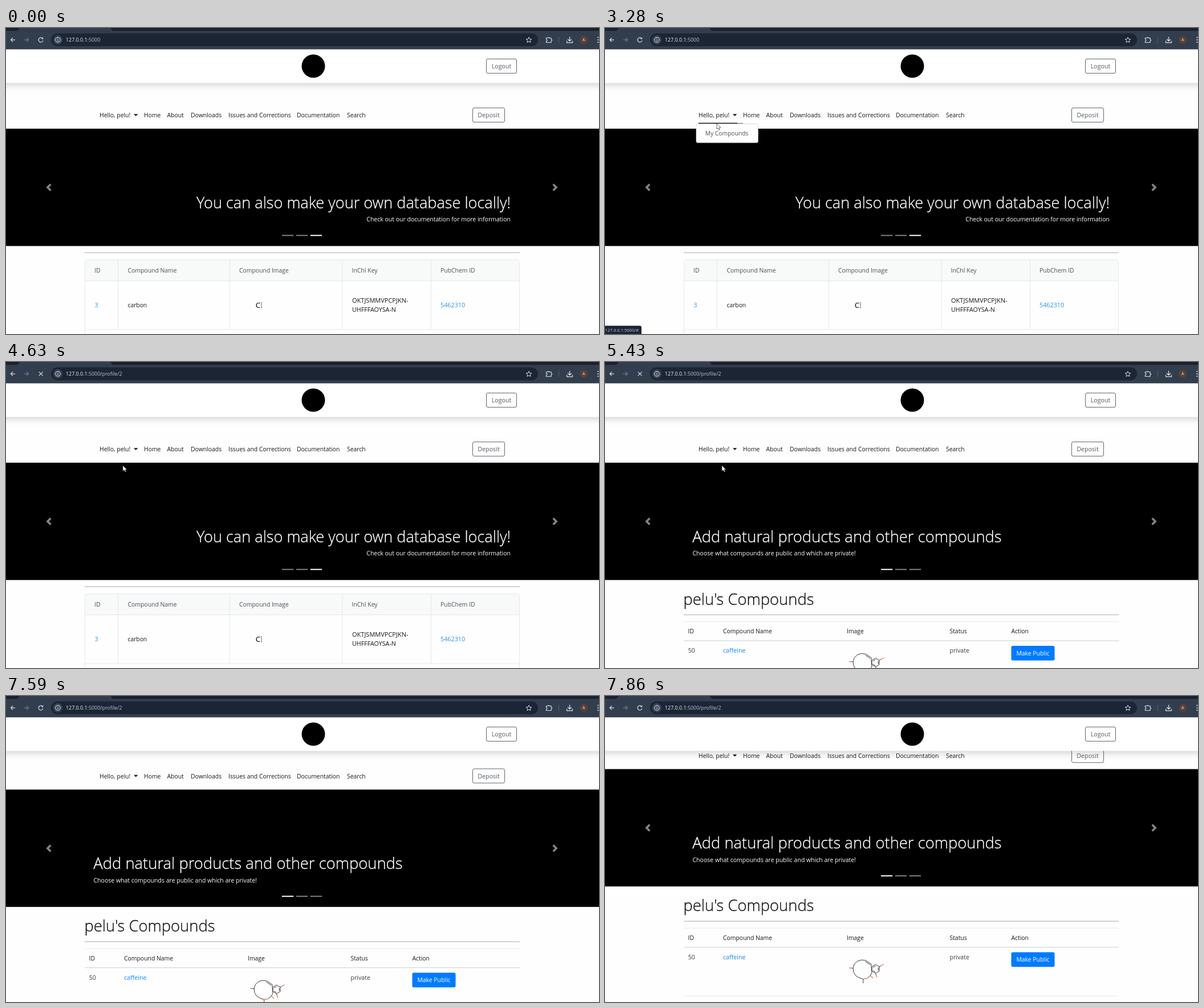
Animation, 1040 px wide and 538 px high, one loop 8000 ms. Source, as an HTML page:

```html
<!DOCTYPE html>
<html lang="en">
<head>
<meta charset="utf-8">
<title>Compound database</title>
<style>
  html, body { margin: 0; width: 100%; height: 100%; overflow: hidden; background: #fefefe; }
  svg { display: block; width: 100vw; height: 100vh; }
  text { font-family: "Open Sans", "Noto Sans", sans-serif; white-space: pre; }
  #header { filter: drop-shadow(0 5px 5.3px rgba(0, 0, 0, .15)); }
</style>
</head>
<body>
<svg id="stage" viewBox="0 0 1040 538"></svg>
<script>
const LOOP = 8000;
const INK = '#16181b', LINK = '#2f93e0', RULE = '#e4e7ea';

// Markup helpers
const text = (x, y, s, { size = 10.5, fill = INK, weight = 400, anchor = 'start', extra = '' } = {}) =>
  `<text x="${x}" y="${y}" font-size="${size}" fill="${fill}" font-weight="${weight}" text-anchor="${anchor}" ${extra}>${s}</text>`;
const heading = (x, y, s, size, fill, anchor) =>
  text(x, y, s, { size, fill, anchor, weight: 300, extra: `stroke="${fill}" stroke-width=".35"` });
const rect = (x, y, w, h, fill, rx = 0, extra = '') =>
  `<rect x="${x}" y="${y}" width="${w}" height="${h}" fill="${fill}" rx="${rx}" ${extra}/>`;
const path = (d, stroke, width = 1, fill = 'none', extra = '') =>
  `<path d="${d}" stroke="${stroke}" stroke-width="${width}" fill="${fill}" ${extra}/>`;
const circle = (x, y, r, fill, extra = '') => `<circle cx="${x}" cy="${y}" r="${r}" fill="${fill}" ${extra}/>`;
const group = (id, ...parts) => `<g id="${id}">${parts.join('')}</g>`;
const row = (y, cells, style) => cells.map(([x, s]) => text(x, y, s, style)).join('');
const outlineButton = (x, y, w, label) =>
  rect(x, y, w, 25, '#fff', 2.5, 'stroke="#60666c"') +
  text(x + w / 2, y + 16.6, label, { size: 10.7, fill: '#555b61', anchor: 'middle' });

const browserBar = () => [
  rect(0, 0, 1040, 37.5, '#323d4d'),
  path('M0 0H24Q22 5 17 5H0ZM184 0H1040V5H190Q185 5 184 0Z', 'none', 0, '#19212e'),
  rect(79, 9.5, 854, 22.5, '#1c2534', 11.2),
  circle(91, 20.8, 8, '#384557'),
  circle(91, 20.8, 4.3, 'none', 'stroke="#e3e8ef"'),
  path('M91 20.2V23.2M91 18.2V19.3', '#e3e8ef', 1),
  path('M16 20.8H8.5M12 17.2 8.4 20.8 12 24.4', '#d8dee7', 1.2),
  path('M32 20.8H39.5M36 17.2 39.6 20.8 36 24.4', '#707c8c', 1.2),
  group('reload', path('M64.4 18.6A4 4 0 1 0 65 21.8', '#d8dee7', 1.2), path('M65.2 16.2V19.6H61.8Z', 'none', 0, '#d8dee7')),
  group('stop', path('M57.8 17.4 64.6 24.2M64.6 17.4 57.8 24.2', '#d8dee7', 1.2)),
  '<text x="105" y="24.2" font-size="8.9" fill="#eef1f5">127.0.0.1<tspan fill="#bcc5d0">:5000</tspan><tspan id="urlPath" fill="#bcc5d0"></tspan></text>',
  path('M917 16.2 918.4 19.4 921.8 19.7 919.2 22 920 25.4 917 23.6 914 25.4 914.8 22 912.2 19.7 915.6 19.4Z', '#d8dee7', 1),
  path('M947.5 17.5H950.2A1.5 1.5 0 0 1 953 17.5H956V20A1.5 1.5 0 0 1 956 23V25.5H947.5V23A1.5 1.5 0 0 0 947.5 20Z', '#d8dee7', 1.2),
  rect(969, 15.5, 1, 11, '#556172'),
  path('M988.5 15.5V22.8M985.2 19.8 988.5 23 991.8 19.8M983.6 22.5V25.8H993.4V22.5', '#d8dee7', 1.3),
  circle(1013.3, 20.8, 7, '#5d4037'),
  text(1013.3, 23.3, 'A', { size: 7, fill: '#f1e9e6', anchor: 'middle' }),
  ...[16.5, 20.8, 25.1].map(y => circle(1038.3, y, 1.1, '#d8dee7')),
];

const header = () => [
  rect(-40, 30, 1120, 66.5, '#fff'),
  circle(539, 67, 20.5, '#000'),
  outlineButton(842.5, 54.5, 53, 'Logout'),
];

const nav = () => [
  row(157.2, [[164, 'Hello, pelu!'], [242, 'Home'], [282.5, 'About'], [324, 'Downloads'],
    [390, 'Issues and Corrections'], [510, 'Documentation'], [598, 'Search']], { size: 10.4 }),
  path('M224 151.2H231.4L227.7 155Z', 'none', 0, INK),
  outlineButton(818.5, 140.5, 56, 'Deposit'),
];

const chevron = (x, d) =>
  `<path transform="translate(${x} 273.6) scale(1.675)" fill="#858585" d="${d}"/>`;
const carousel = () => [
  rect(0, 177, 1040, 206.3, '#000'),
  chevron(68.3, 'M5.25 0l-4 4 4 4 1.5-1.5L4.25 4l2.5-2.5L5.25 0z'),
  chevron(956.3, 'M2.75 0l-1.5 1.5L3.75 4l-2.5 2.5L2.75 8l4-4-4-4z'),
];
const indicators = active =>
  [0, 1, 2].map(i => rect(484 + i * 24.9, 363.7, 20.3, 2, i === active ? '#fff' : '#808080')).join('');

const home = () => [
  heading(885, 316.5, 'You can also make your own database locally!', 27.15, '#fff', 'end'),
  text(885, 340.3, 'Check out our documentation for more information', { fill: '#fff', anchor: 'end' }),
  indicators(2),
  rect(138, 394.3, 763, 1.3, '#bcbcbc'),
  rect(138.5, 407.5, 762, 150, '#fefefe', 4, `stroke="${RULE}"`),
  path('M139 444V411.5Q139 408 142.5 408H896.5Q900 408 900 411.5V444Z', 'none', 0, '#f8f9f9'),
  path('M138 444.5H901M138 530H901M196.5 408V530M392.5 408V530M590 408V530M745.5 408V530', RULE),
  row(430, [[155, 'ID'], [213.5, 'Compound Name'], [409, 'Compound Image'], [606.5, 'InChI Key'], [762, 'PubChem ID']],
    { size: 10.4, weight: 500, fill: '#495057' }),
  text(155.5, 491, '3', { fill: LINK }),
  text(213.5, 491, 'carbon', { size: 10.3 }),
  text(437.8, 492, 'C', { size: 13.5, fill: '#000' }),
  ...[482.6, 485.4, 488.2, 491].map(y => rect(447.4, y, 1.3, 1.3, '#000')),
  text(607, 482.5, 'OKTJSMMVPCPJKN-', { size: 11 }),
  text(607, 499, 'UHFFFAOYSA-N', { size: 10.7 }),
  text(762, 491, '5462310', { size: 10.8, fill: LINK }),
];

const molecule = () => [
  path('M467 524 468 535 465.5 540 459.5 545M452.5 546 446 544 439.5 540 436 534 435 526.5 437.5 519.5 443 514.5 450 512.5 457.5 513.5 467 520V524M456.5 515.2 465.3 521.3', '#222', .9),
  path('M468 524.5 474.5 520.5 481 524.5V532L474.5 536 468 532ZM470 525.8 474.5 523M479.2 526V531M474.3 534 470 531.3M481 524.5 484.5 522.3M474.5 536 475.7 540M465.5 540 467.2 542M435 527 432 526.8M452.7 546V553.5', '#222', .9),
  path('M432 526.7H428M484.5 522.3 489 520M475.7 540 477 543.5M467.2 542 470 544.5M459.5 545 452.5 546', '#f0854a', 1.4),
];

const profile = () => [
  heading(153.3, 316.5, 'Add natural products and other compounds', 27.4, '#fff'),
  text(153.5, 340.3, 'Choose what compounds are public and which are private!', { fill: '#fff' }),
  indicators(0),
  heading(137.5, 426.5, "pelu's Compounds", 27.4, INK),
  rect(138, 443.8, 763, 1.3, '#bcbcbc'),
  path('M138 456.5H901M138 576H901', RULE),
  rect(138, 489.5, 763, 1.3, '#d5d9dd'),
  row(477, [[145.5, 'ID'], [207, 'Compound Name'], [424, 'Image'], [604.5, 'Status'], [712.5, 'Action']],
    { size: 10.4, weight: 500 }),
  row(511, [[145.8, '50'], [604.5, 'private']], { size: 10.6, fill: '#3a3f44' }),
  text(207, 511, 'caffeine', { size: 10.7, fill: '#1684f5' }),
  ...molecule(),
  rect(712.5, 499, 76, 25.7, '#007bff', 2.7),
  text(750.5, 515.6, 'Make Public', { size: 10.4, fill: '#fff', anchor: 'middle' }),
];

const menu = () => [
  rect(160, 168.5, 108.5, 33.3, '#fff', 2.7, 'stroke="#c9c9c9" stroke-width=".7"'),
  '<rect id="menuItem" x="160.4" y="174" width="107.7" height="23"/>',
  '<text id="menuLabel" x="175.7" y="189" font-size="10.3">My Compounds</text>',
];

const stage = document.getElementById('stage');
stage.innerHTML = [
  group('page', ...nav(), ...carousel(), group('home', ...home()), group('profile', ...profile()),
    group('underline', '<rect id="bar" x="164" y="166.7" height="1.7" fill="#111"/>', rect(232, 167, 10, 1, '#777')),
    group('menu', ...menu())),
  group('header', ...header()),
  ...browserBar(),
  group('status', path('M0 523.5H61Q64 523.5 64 526.5V538H0Z', 'none', 0, '#1c2534', 'id="bubble"'),
    '<text id="statusText" x=".3" y="533.8" font-size="7.5" fill="#c9d1db"></text>'),
  group('cursor',
    group('arrow', path('M0 0V9.8L2.3 7.8 3.9 11.4 5.5 10.7 4 7.2H7Z', '#333', .7, '#fff')),
    group('hand', path('M0 .8Q1 -.6 2 .8V4.2L6 5.2Q7 5.6 7 6.8L6.2 11H1L-2.3 7.3Q-2.3 5.7-.9 6.2L0 7Z', '#333', .7, '#fff'))),
].join('');

const el = Object.fromEntries([...stage.querySelectorAll('[id]')].map(n => [n.id, n]));
const show = (node, on) => { node.style.display = on ? '' : 'none'; };
const between = (t, a, b) => t >= a && t < b;
const clamp01 = v => Math.min(1, Math.max(0, v));

// Pointer path: time, x, y
const pointer = [
  [770, 893, 520], [910, 659, 390], [1230, 659, 390], [1510, 387, 262.5], [1800, 387, 262.5],
  [2370, 194, 151], [3220, 194, 151], [3280, 196, 168], [3350, 196, 168], [3620, 205, 182],
  [5900, 205, 182], [6200, 592, 193], [6470, 592, 193], [6600, 1016, 124],
];
function pointerAt(t) {
  const next = pointer.findIndex(k => k[0] > t);
  if (next < 1) return pointer[next < 0 ? pointer.length - 1 : 0].slice(1);
  const [t0, x0, y0] = pointer[next - 1], [t1, x1, y1] = pointer[next];
  const k = (t - t0) / (t1 - t0);
  return [x0 + (x1 - x0) * k, y0 + (y1 - y0) * k];
}

const scrollSteps = [12.5, 25, 35.5, 43, 48.5];
const scrollAt = t => t < 7590 ? 0 : scrollSteps[Math.min(4, Math.floor((t - 7590) / 67))];

function render(t) {
  const loaded = t >= 5360;
  show(el.home, !loaded);
  show(el.profile, loaded);
  el.page.setAttribute('transform', `translate(0 ${-scrollAt(t)})`);

  const loading = between(t, 4010, 5960);
  show(el.stop, loading);
  show(el.reload, !loading);
  el.urlPath.textContent = t >= 4420 ? '/profile/2' : '';

  const grow = clamp01((t - 2130) / 200);
  show(el.underline, between(t, 2130, 3420));
  el.bar.setAttribute('width', 68 * grow);
  show(el.underline.lastChild, grow === 1);

  const onItem = t >= 3420, pressed = t >= 3820;
  show(el.menu, between(t, 2800, 4010));
  el.menuItem.setAttribute('fill', pressed ? '#007bff' : onItem ? '#f8f9fa' : '#fff');
  el.menuLabel.setAttribute('fill', pressed ? '#fff' : '#4a4f55');

  show(el.status, between(t, 2230, 4490));
  el.statusText.textContent = '127.0.0.1:5000/' + (onItem ? 'profile/2' : '#');
  el.bubble.setAttribute('transform', `scale(${onItem ? 1.42 : 1} 1)`);

  const [x, y] = pointerAt(t);
  const hand = between(t, 2130, 3280) || between(t, 3420, 4080);
  show(el.cursor, between(t, 770, 6655));
  show(el.hand, hand);
  show(el.arrow, !hand);
  el.cursor.setAttribute('transform', `translate(${x} ${y})`);
}

const start = performance.now();
function tick() {
  render((performance.now() - start) % LOOP);
  requestAnimationFrame(tick);
}
tick();
</script>
</body>
</html>
```
